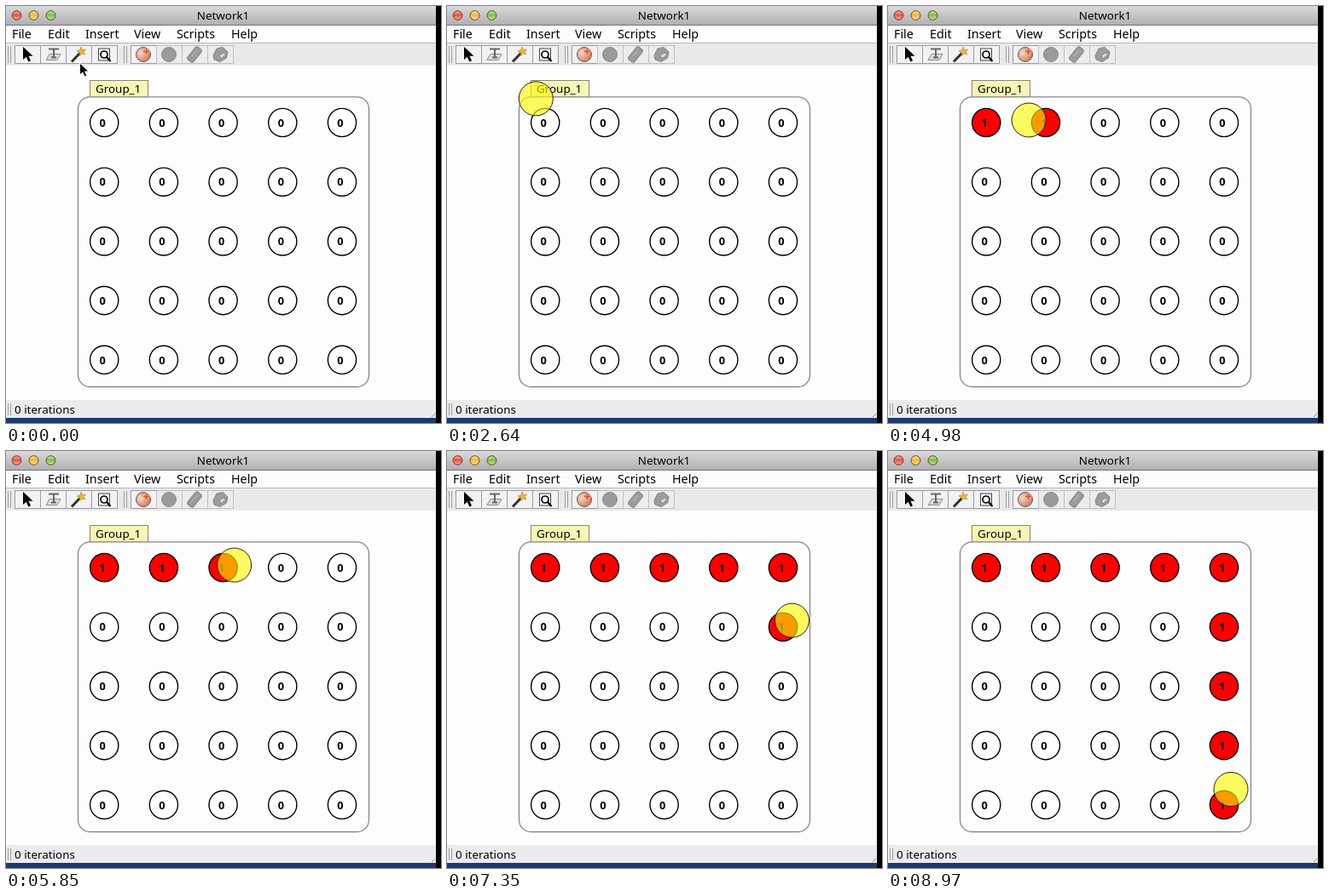
These frames come from a looping animation (510 px wide and 490 px high, 9 s). An HTML page:

```html
<!DOCTYPE html>
<html lang="en">
<head>
<meta charset="utf-8">
<title>Network</title>
<style>
  html, body { margin: 0; width: 100%; height: 100%; overflow: hidden; background: #000; }
  svg { display: block; width: 510px; height: 490px; }
  text { font-family: "Noto Sans", "Open Sans", sans-serif; font-size: 13.4px; fill: #000; }
  .menu text { font-size: 14.3px; }
  .node text { font-size: 12.8px; font-weight: 700; text-anchor: middle; }
</style>
</head>
<body>
<svg id="stage" viewBox="0 0 510 490">
  <defs>
    <linearGradient id="titleBar" x2="0" y2="1">
      <stop offset="0" stop-color="#dadadc"/>
      <stop offset="1" stop-color="#b0b0b4"/>
    </linearGradient>
    <linearGradient id="shine" x2="0" y2="1">
      <stop offset="0" stop-color="#fff" stop-opacity=".55"/>
      <stop offset=".45" stop-color="#fff" stop-opacity="0"/>
      <stop offset="1" stop-color="#fff" stop-opacity=".5"/>
    </linearGradient>
    <radialGradient id="sphere" cx=".3" cy=".4" r=".75">
      <stop offset="0" stop-color="#f0d8cc"/>
      <stop offset="1" stop-color="#d4714c"/>
    </radialGradient>
  </defs>

  <rect width="510" height="490" fill="#000"/>
  <rect y="484" width="504" height="6" fill="#1c3a72"/>
  <rect width="504" height="484" fill="#fdfdfd"/>
  <rect width="504" height="22" fill="url(#titleBar)"/>
  <path d="M0 22.5H504" stroke="#747478"/>
  <g id="lights"></g>
  <text x="254.5" y="16" text-anchor="middle">Network1</text>
  <g class="menu" id="menu"></g>

  <rect y="44" width="504" height="26" fill="#e9e9ec"/>
  <path d="M0 43.5H504" stroke="#b4b4cc"/>
  <path d="M2.5 47V67M5.5 47V67M138.5 47V67M141.5 47V67" stroke="#a0a0a0"/>
  <rect y="463" width="504" height="21" fill="#ebebee"/>
  <path d="M2.5 467V481M5.5 467V481" stroke="#a0a0a0"/>
  <path d="M499 483L503 479" stroke="#858585"/>
  <text x="10" y="479">0 iterations</text>

  <g id="buttons"></g>
  <path d="M20 48V63L23.7 59.7L26.4 65.4L29 64.2L26.4 58.7H31.5Z" fill="#000"/>
  <g fill="none" stroke="#8a8a8a">
    <path d="M47 63.5L51 56.5H64L60 63.5Z" fill="#dcdcdc"/>
    <path d="M50 50.5H62M56 50V60M53 60.5H59" stroke="#5c6a64" stroke-width="2"/>
  </g>
  <g id="wand">
    <path d="M77 65.5L86.5 55.5" stroke="#33332a" stroke-width="3"/>
    <path d="M88 48L89.5 51.5L93.5 51L91 54L93 57L89.2 56L86.5 58.5L86.5 54.5L83 53L86.8 51.7Z" fill="#eeb82c" stroke="#a88420" stroke-width=".6"/>
  </g>
  <g fill="none" stroke="#000">
    <rect x="108.5" y="50" width="13" height="14" fill="#f8f8f8" stroke="#444"/>
    <circle cx="115" cy="57" r="4" stroke-width="1.7"/>
    <path d="M118 60L122.5 65" stroke-width="2.2"/>
  </g>
  <circle cx="161" cy="57" r="8.5" fill="url(#sphere)" stroke="#6d5850"/>
  <path d="M164.5 49.5V57.5M160.5 53.5H168.5" stroke="#f6c8ae" stroke-width="3.6"/>
  <path d="M164.5 50V57M161 53.5H168" stroke="#e0562c" stroke-width="2"/>
  <circle cx="191" cy="57" r="8.5" fill="#9a9a9a" stroke="#8c8c8c"/>
  <g fill="#9c9c9c" stroke="#858585">
    <rect x="211.5" y="52.5" width="19" height="9" rx="3" transform="rotate(-51 221 57)"/>
    <path d="M243 58L247 50L254 48.5L260 54L258.5 61L251 65.5L244 63Z"/>
    <path d="M250 58L255 55L258 57L252 62Z" fill="#dadada"/>
    <path d="M218 59L224 52" stroke="#c4c4c4"/>
  </g>

  <rect x="98.5" y="87.5" width="68" height="19.5" fill="#f6f6b4" stroke="#858578"/>
  <text x="105" y="102">Group_1</text>
  <rect x="84.5" y="106.8" width="341" height="340.7" rx="14" fill="#fdfdfd" stroke="#868686" stroke-width="1.3"/>
  <g id="nodes"></g>
  <circle id="brush" r="20" fill="#fafa00" fill-opacity=".62" stroke="#222"/>
  <path id="pointer" d="M0 0V14L3.3 11L5.7 16.2L8.4 15L6 10H10.5Z" fill="#000" stroke="#fff" stroke-width="1"/>
</svg>

<script>
const LOOP = 9000, PRESS = 1500, RELEASE = 1860, PAINT_START = 4350;
const REACH = 37, COUNT = 5, GAP = 69.7;

const $ = id => document.getElementById(id);

function add(parent, tag, attrs, text = "") {
  const el = document.createElementNS("http://www.w3.org/2000/svg", tag);
  for (const key in attrs) el.setAttribute(key, attrs[key]);
  el.textContent = text;
  parent.append(el);
  return el;
}

["#ef4f3c", "#f2b632", "#7fbe3f"].forEach((color, i) => {
  const spot = { cx: 12.5 + 20 * i, cy: 11, r: 5.5 };
  add($("lights"), "circle", { ...spot, fill: color, stroke: "#6c5938" });
  add($("lights"), "circle", { ...spot, r: 4.6, fill: "url(#shine)" });
});

Object.entries({ File: 7, Edit: 49, Insert: 93, View: 150, Scripts: 200, Help: 264 })
  .forEach(([label, x]) => add($("menu"), "text", { x, y: 38 }, label));

for (const x of [10, 40, 70, 100, 146, 176, 206, 236]) {
  const disabled = x > 146;
  add($("buttons"), "rect", {
    x: x + .5, y: 46.5, width: 30, height: 21,
    fill: disabled ? "#ececee" : "#f2f2f4", stroke: disabled ? "#c0c0c0" : "#9c9c9c"
  });
}

const nodes = Array.from({ length: COUNT * COUNT }, (_, i) => {
  const x = 115.2 + GAP * (i % COUNT), y = 137 + GAP * Math.floor(i / COUNT);
  const group = add($("nodes"), "g", { class: "node" });
  const disc = add(group, "circle", { cx: x, cy: y, r: 16.6, stroke: "#000", "stroke-width": 1.4 });
  const label = add(group, "text", { x: x - 2, y: y + 4.7 });
  return { x, y, disc, label };
});

// Mouse route: time, x, y
const route = [
  [0, 86.5, 67], [900, 86.5, 67], [1350, 85.5, 55], [2050, 85.5, 55],
  [2900, 112.5, 132.5], [4450, 112.5, 132.5], [4980, 165, 134],
  [5850, 267.5, 134], [6850, 399, 138], [7350, 404.5, 199], [8970, 402, 397.5]
];

function mouseAt(t) {
  const next = route.findIndex(p => p[0] > t);
  if (next < 0) return route.at(-1).slice(1);
  const [t0, x0, y0] = route[next - 1], [t1, x1, y1] = route[next];
  const k = (t - t0) / (t1 - t0);
  return [x0 + (x1 - x0) * k, y0 + (y1 - y0) * k];
}

// Each node lights up the first time the pressed brush touches it.
for (const node of nodes) {
  node.litAt = Infinity;
  for (let t = PAINT_START; t < LOOP; t += 10) {
    const [x, y] = mouseAt(t);
    if (Math.hypot(x - node.x, y - node.y) < REACH) { node.litAt = t; break; }
  }
}

function render(t) {
  const [x, y] = mouseAt(t);
  const place = `translate(${x} ${y})`;
  const painting = t > RELEASE && y > 70;
  const pressed = t >= PRESS && t < RELEASE;

  $("brush").setAttribute("transform", place);
  $("pointer").setAttribute("transform", place);
  $("brush").setAttribute("visibility", painting ? "visible" : "hidden");
  $("pointer").setAttribute("visibility", painting ? "hidden" : "visible");
  $("wand").setAttribute("opacity", pressed ? .55 : 1);

  for (const { disc, label, litAt } of nodes) {
    const lit = t >= litAt;
    disc.setAttribute("fill", lit ? "#f00" : "#fff");
    label.textContent = lit ? "1" : "0";
  }
}

const start = performance.now();
function tick() {
  render((performance.now() - start) % LOOP);
  requestAnimationFrame(tick);
}
tick();
</script>
</body>
</html>
```
